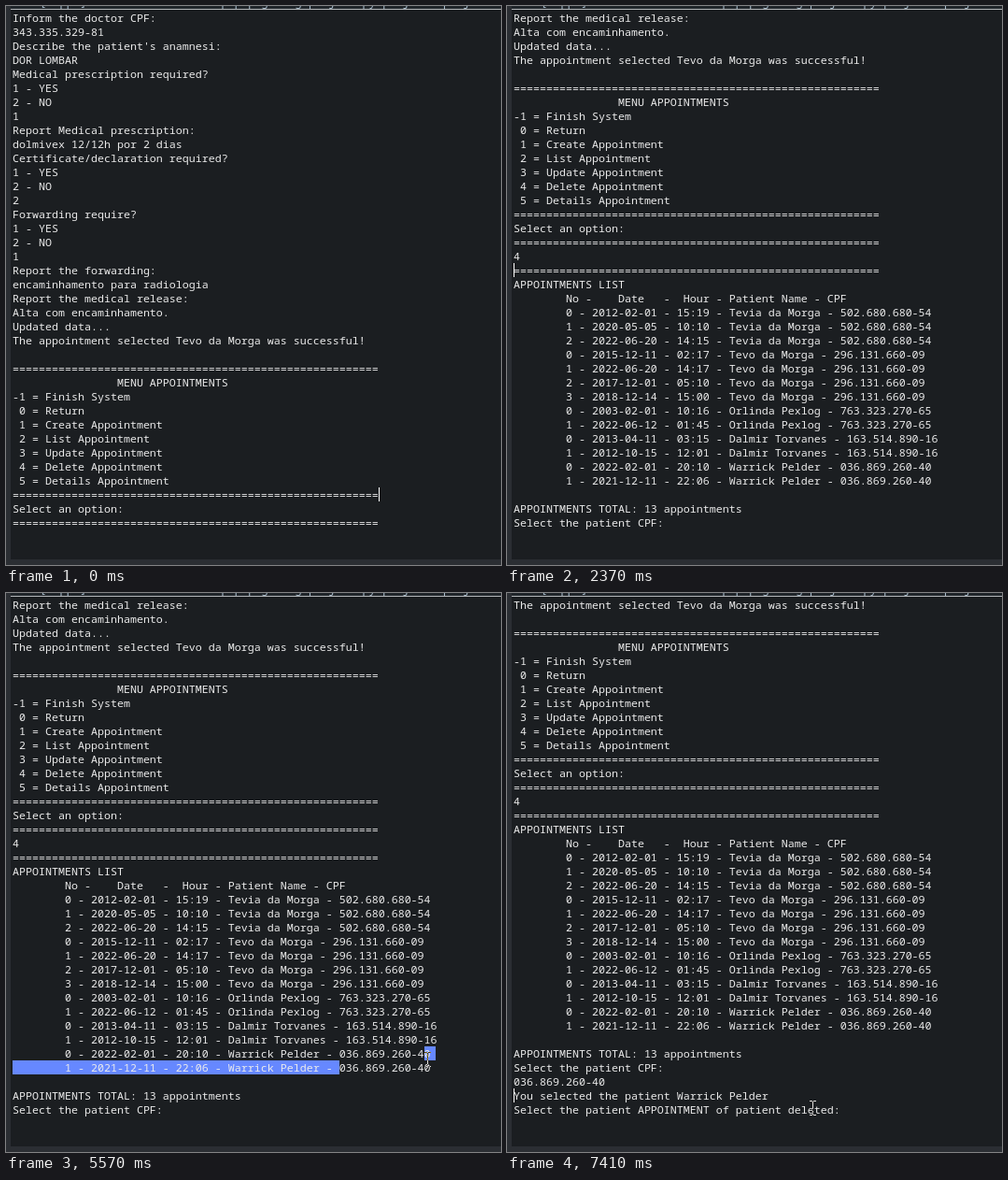
Animation, 530 px wide and 598 px high, one loop 8 s. Source, as an HTML page:

```html
<!DOCTYPE html>
<html lang="en">
<head>
<meta charset="utf-8">
<title>Appointments console</title>
<style>
  html, body { margin: 0; width: 100%; height: 100%; overflow: hidden; background: #1b1e21; }
  #stage { position: relative; width: 530px; height: 598px; overflow: hidden; background: #1b1e21; }
  #stage > * { position: absolute; }
  pre { margin: 0; left: 7px; top: 5px; color: #ebebeb; font: 11.667px/15px "Noto Sans Mono", monospace; }
  .title { left: 0; top: 0; width: 530px; height: 3px; overflow: hidden; background: #1f2429; border-bottom: 1px solid #b4b7ba; }
  .title span { position: absolute; left: 36px; top: -12px; white-space: pre; color: #a9bccb; font: 12px/15px "Noto Sans Mono", monospace; }
  .left { left: 0; top: 0; width: 5px; height: 598px; background: #2b2e33; }
  .bottom { left: 0; top: 592px; width: 530px; height: 6px; background: #2b2e33; }
  .sel { height: 15px; background: #6688ff; }
  #caret { width: 1px; height: 15px; background: #fff; }
  #mouse { width: 8px; height: 16px; mix-blend-mode: difference; }
</style>
</head>
<body>
<div id="stage">
  <div class="title"><span>[ app ]  C:\              \p\p\pages\lg\projeto\py\projects\proj</span></div>
  <div class="left"></div>
  <div class="bottom"></div>
  <div class="sel"></div>
  <div class="sel"></div>
  <pre id="text"></pre>
  <div id="caret"></div>
  <svg id="mouse" viewBox="0 0 8 16" fill="none" stroke="#fff" shape-rendering="crispEdges">
    <path d="M1 .5h3M5 .5h3M4.5 1v14M1 15.5h3M5 15.5h3"/>
  </svg>
</div>
<script>
const $ = id => document.getElementById(id);
const rule = '='.repeat(56), yesNo = '1 - YES\n2 - NO\n';

const patients = [
  ['Tevia da Morga', '502.680.680-54', '2012-02-01 - 15:19', '2020-05-05 - 10:10', '2022-06-20 - 14:15'],
  ['Tevo da Morga', '296.131.660-09', '2015-12-11 - 02:17', '2022-06-20 - 14:17', '2017-12-01 - 05:10', '2018-12-14 - 15:00'],
  ['Orlinda Pexlog', '763.323.270-65', '2003-02-01 - 10:16', '2022-06-12 - 01:45'],
  ['Dalmir Torvanes', '163.514.890-16', '2013-04-11 - 03:15', '2012-10-15 - 12:01'],
  ['Warrick Pelder', '036.869.260-40', '2022-02-01 - 20:10', '2021-12-11 - 22:06']
];
const table = patients.flatMap(([name, cpf, ...dates]) =>
  dates.map((date, i) => `        ${i} - ${date} - ${name} - ${cpf}`)).join('\n');

const lines = `Inform the doctor CPF:
343.335.329-81
Describe the patient's anamnesi:
DOR LOMBAR
Medical prescription required?
${yesNo}1
Report Medical prescription:
dolmivex 12/12h por 2 dias
Certificate/declaration required?
${yesNo}2
Forwarding require?
${yesNo}1
Report the forwarding:
encaminhamento para radiologia
Report the medical release:
Alta com encaminhamento.
Updated data...
The appointment selected Tevo da Morga was successful!

${rule}
                MENU APPOINTMENTS
-1 = Finish System
 0 = Return
 1 = Create Appointment
 2 = List Appointment
 3 = Update Appointment
 4 = Delete Appointment
 5 = Details Appointment
${rule}
Select an option:
${rule}
4
${rule}
APPOINTMENTS LIST
        No -    Date   -  Hour - Patient Name - CPF
${table}

APPOINTMENTS TOTAL: 13 appointments
Select the patient CPF:
036.869.260-40
You selected the patient Warrick Pelder
Select the patient APPOINTMENT of patient deleted:`.split('\n');

// [time, first line, end line]
const views = [[0, 0, 37], [1670, 0, 38], [2370, 20, 57], [6990, 20, 58], [7410, 23, 60]];
// [time, column, row]; hidden without a position
const carets = [[0, 56, 34], [290], [750, 56, 34], [1370], [1670, 1, 37], [2250],
  [2370, 0, 18], [2870], [3370, 0, 18], [3920], [4490, 0, 18], [5040],
  [6690, 23, 36], [6990, 14, 37], [7410, 0, 35]];
// [time, x, y] of the pointer
const pointer = [[0], [3650, 531, 390], [3790, 470, 424], [3920, 399, 460], [4070, 369, 482],
  [4220, 358, 494], [4340, 352, 502], [4490, 354, 505], [4610, 356, 507], [4760, 357, 507],
  [5040, 366, 507], [5170, 398, 507], [5290, 437, 507], [5440, 450, 504], [5570, 451, 499],
  [5710, 456, 505], [5840, 458, 507], [6300, 455, 503], [6450, 428, 513], [6570, 356, 538],
  [6690, 327, 551]];

const at = (steps, t) => steps.findLast(s => s[0] <= t);
const colX = col => 7 + 7 * col, rowY = row => 5 + 15 * row;
const bars = document.querySelectorAll('.sel');

function place(el, x, y, width) {
  el.style.display = x === undefined ? 'none' : 'block';
  el.style.left = x + 'px';
  el.style.top = y + 'px';
  if (width) el.style.width = width + 'px';
}

// Drag starts at column 50 of row 33 and is kept until the next click.
function drawSelection(t, x, y) {
  bars.forEach(bar => place(bar));
  if (t < 5040 || t >= 6690) return;
  const anchor = colX(50);
  const end = t >= 5710 ? colX(64) : colX(Math.floor((x - 7) / 7));
  if (t < 5710 && y < rowY(33)) {
    place(bars[0], end, rowY(32), 460 - end);
    place(bars[1], 7, rowY(33), anchor - 7);
  } else if (end > anchor) {
    place(bars[0], anchor, rowY(33), end - anchor);
  }
}

let shown;
function draw() {
  const t = performance.now() % 8000;
  const view = at(views, t);
  if (view !== shown) {
    shown = view;
    $('text').textContent = lines.slice(view[1], view[2]).join('\n');
  }
  const [, col, row] = at(carets, t);
  if (col === undefined) place($('caret'));
  else place($('caret'), colX(col), rowY(row));
  const [, x, y] = at(pointer, t);
  if (x === undefined) place($('mouse'));
  else place($('mouse'), x - 4, y - 8);
  drawSelection(t, x, y);
  requestAnimationFrame(draw);
}
draw();
</script>
</body>
</html>
```
